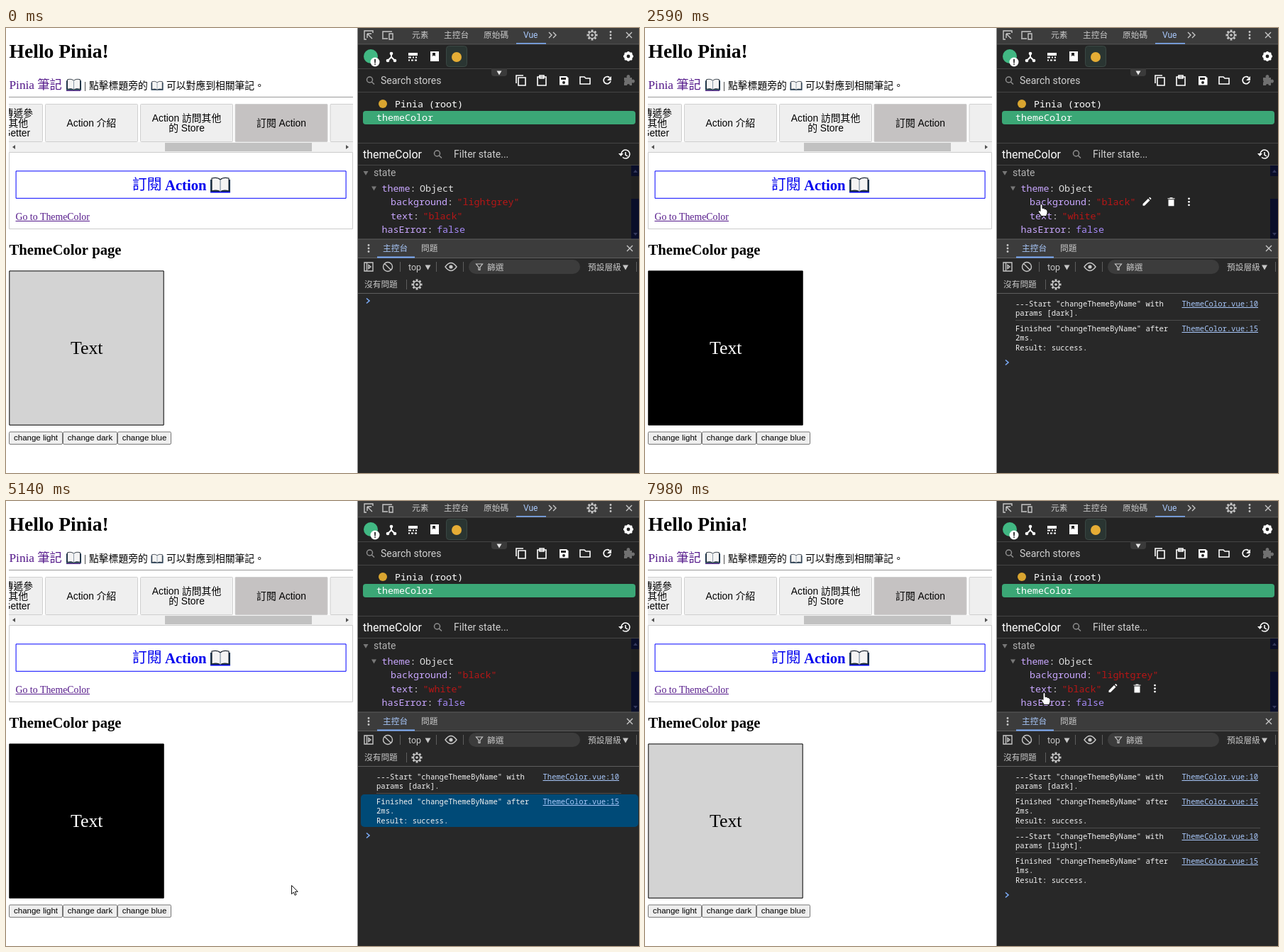
These frames come from a looping animation (892x628 px, 8 s). An HTML page with a canvas:

```html
<!DOCTYPE html>
<html lang="zh-Hant">
<head>
<meta charset="utf-8">
<title>Pinia notes</title>
<style>
html, body { margin: 0; width: 100%; height: 100%; overflow: hidden; background: #fff; }
canvas { display: block; }
</style>
</head>
<body>
<canvas id="stage" width="892" height="628"></canvas>
<script>
const c = document.getElementById('stage').getContext('2d');
const CJK = '"Noto Sans CJK TC", "Noto Sans CJK", sans-serif';
const SERIF = '"Liberation Serif", ' + CJK;
const SANS = '"Liberation Sans", ' + CJK;
const UI = 'Roboto, ' + CJK;
const MONO = '"Noto Sans Mono", monospace';
const LOOP = 8000;

// cursor path: time, x, y
const path = [
  [250, 822, 612], [390, 700, 400], [460, 620, 286], [740, 380, 420], [1010, 126, 580],
  [1080, 119, 573], [1965, 119, 573], [2310, 330, 420], [2520, 520, 290], [2600, 560, 246],
  [2720, 575, 247], [2800, 570, 262], [2870, 565, 266], [3080, 570, 310], [3220, 566, 424],
  [3290, 560, 400], [3500, 560, 400], [3700, 590, 438], [3980, 579, 428], [4330, 579, 428],
  [4600, 560, 470], [4930, 531, 515], [5000, 525, 519], [5300, 280, 565], [5560, 29, 594],
  [5630, 40, 588], [5830, 44, 586], [6100, 46, 583], [6590, 46, 583], [6850, 681, 323],
  [6890, 681, 323], [7000, 640, 260], [7130, 600, 228], [7300, 590, 240], [7420, 600, 246],
  [7700, 575, 250], [7840, 565, 260], [7980, 562, 270]
];
const presses = [[1630, 1760], [3430, 3500], [4180, 4310], [6310, 6380]];

const within = (t, a, b) => t >= a && t < b;

function cursorAt(t) {
  if (t < 250) return null;
  const q = 250 + Math.floor((t - 225) / 69.02) * 69.02;
  let i = 1;
  while (i < path.length - 1 && path[i][0] < q) i++;
  const [t0, x0, y0] = path[i - 1], [t1, x1, y1] = path[i];
  const k = Math.min(1, Math.max(0, (q - t0) / (t1 - t0)));
  return { x: Math.round(x0 + (x1 - x0) * k), y: Math.round(y0 + (y1 - y0) * k) };
}

function text(s, x, y, font, color, align = 'left') {
  c.font = font;
  c.fillStyle = color;
  c.textAlign = align;
  c.fillText(s, x, y);
}
function rect(x, y, w, h, color) {
  c.fillStyle = color;
  c.fillRect(x, y, w, h);
}
function box(x, y, w, h, fill, edge, r = 0) {
  const d = edge ? .5 : 0;
  c.beginPath();
  c.roundRect(x + d, y + d, w - 2 * d, h - 2 * d, r);
  if (fill) { c.fillStyle = fill; c.fill(); }
  if (edge) { c.strokeStyle = edge; c.lineWidth = 1; c.stroke(); }
}
function dot(x, y, r, color) {
  c.fillStyle = color;
  c.beginPath();
  c.arc(x, y, r, 0, 7);
  c.fill();
}
function shape(d, x, y, fill, stroke, w = 1.4) {
  c.save();
  c.translate(x, y);
  const p = new Path2D(d);
  if (fill) { c.fillStyle = fill; c.fill(p); }
  if (stroke) { c.strokeStyle = stroke; c.lineWidth = w; c.stroke(p); }
  c.restore();
}
const line = (d, x, y, color = '#c7c7c7', w) => shape(d, x, y, null, color, w);
const down = (x, y, color = '#c7c7c7', s = 4) => shape(`M${-s} ${-s * .75}H${s}L0 ${s}Z`, x, y, color);
const cross = (x, y) => line('M-4-4 4 4M4-4-4 4', x, y);
const dots = (x, y, color = '#c7c7c7') => [-4.5, 0, 4.5].forEach(d => dot(x, y + d, 1.4, color));
const lens = (x, y) => line('M3.5 0A4 4 0 1 1-4.5 0A4 4 0 1 1 3.5 0M2.2 3 6 6.5', x, y - 1, '#8f8f8f', 1.5);

function gear(x, y, r, color, solid) {
  c.save();
  c.translate(x, y);
  c.strokeStyle = color;
  c.lineWidth = solid ? r * .55 : 1.5;
  c.beginPath();
  c.arc(0, 0, r * .62, 0, 7);
  c.stroke();
  c.lineWidth = r * .38;
  for (let i = 0; i < 8; i++) {
    c.rotate(Math.PI / 4);
    c.beginPath();
    c.moveTo(r * .68, 0);
    c.lineTo(r, 0);
    c.stroke();
  }
  if (!solid) dot(0, 0, r * .24, color);
  c.restore();
}

function book(x, y, w) {
  const k = w / 28;
  c.save();
  c.translate(x, y);
  c.scale(k, k);
  shape('M0 3H28V21H0Z', 0, 0, '#17344f');
  shape('M2 1Q10-1 14 3Q18-1 26 1V19Q18 17 14 20Q10 17 2 19Z', 0, 0, '#f4f4f4', '#202a35', 1.2);
  line('M14 3V20', 0, 0, '#8090a0', 1.2);
  c.restore();
}

function tab(x, w, lines, on) {
  box(x, 107, w, 54, on ? '#c5c2c2' : '#efefef', '#cfcfcf', 1);
  lines.forEach((s, i) =>
    text(s, x + w / 2, 139 + (i - (lines.length - 1) / 2) * 14, '300 13.8px ' + SANS, '#000', 'center'));
}

function drawPage(dark, cur) {
  rect(0, 0, 496, 628, '#fff');
  text('Hello Pinia!', 4.5, 42, 'bold 27.6px ' + SERIF, '#000');
  text('Pinia 筆記', 4.5, 86, '300 17.25px ' + SERIF, '#551a8b');
  book(85, 72, 21);
  rect(85, 88, 20, 1, '#551a8b');
  const body = '300 13.8px ' + SERIF;
  text('|', 110, 86, body, '#000');
  text('點擊標題旁的', 117, 86, body, '#000');
  book(204.5, 75, 17);
  text('可以對應到相關筆記。', 226, 86, body, '#000');
  rect(4, 97, 485, 1, '#9a9a9a');

  c.save();
  c.beginPath();
  c.rect(4, 100, 485, 76);
  c.clip();
  box(-79, 107, 131, 54, '#efefef', '#cfcfcf', 1);
  ['傳遞參', '其他', 'Getter'].forEach((s, i) =>
    text(s, [38, 31, 34][i], 125 + i * 14, '300 13.8px ' + SANS, '#000', 'right'));
  tab(55, 131, ['Action 介紹']);
  tab(189, 131, ['Action 訪問其他', '的 Store']);
  tab(322.5, 131, ['訂閱 Action'], true);
  tab(456.5, 131, []);
  rect(4, 161, 485, 14, '#f1f1f1');
  rect(224, 162, 207, 12, '#c1c1c1');
  shape('M2-3V3L-2 0Z', 11, 168, '#505050');
  shape('M-2-3V3L2 0Z', 481, 168, '#505050');
  c.restore();

  box(4, 175, 485, 109, null, '#ccc');
  box(13.6, 201.4, 466, 39.4, null, '#00f');
  text('訂閱', 178, 228, '500 20.7px ' + SERIF, '#0000ee');
  text('Action', 224, 228.5, 'bold 20.7px ' + SERIF, '#0000ee');
  book(288, 211, 28);
  rect(288, 231, 28, 1.5, '#0000ee');
  text('Go to ThemeColor', 13.5, 271, '13.8px ' + SERIF, '#551a8b');
  rect(13.5, 272, 104.5, 1, '#551a8b');

  text('ThemeColor page', 4.5, 320, 'bold 20.7px ' + SERIF, '#000');
  box(4.3, 342.4, 218.4, 218.4, dark ? '#000' : '#d3d3d3', '#000');
  text('Text', 113.7, 460, '25.9px ' + SERIF, dark ? '#fff' : '#000', 'center');
  [['light', 4, 76], ['dark', 80, 77], ['blue', 157, 76]].forEach(([s, x, w]) => {
    const over = cur && within(cur.x, x, x + w) && within(cur.y, 570, 588);
    box(x, 569.5, w, 18.4, over ? '#e5e5e5' : '#efefef', over ? '#4f4f4f' : '#767676', 1.5);
    text('change ' + s, x + w / 2, 582, '11.5px ' + SANS, '#000', 'center');
  });
}

function drawTop() {
  rect(496, 0, 396, 628, '#282828');
  rect(496, 0, 396, 23, '#3c3c3c');
  line('M6-3V-6H-6V6H-3M-2-2 5 5M-2-2V4M-2-2H4', 511, 10);
  line('M-7 4V-5H6M-8 5H0M2-2H7V6H2Z', 538, 10);
  const f = '11.7px ' + UI;
  text('元素', 572, 13.5, f, '#c7c7c7');
  text('主控台', 617, 13.5, f, '#c7c7c7');
  text('原始碼', 673, 13.5, f, '#c7c7c7');
  text('Vue', 729, 14, '12px ' + UI, '#a8c7fa');
  rect(719, 21, 42, 2, '#7cacf8');
  line('M-5-4-1 0-5 4M1-4 5 0 1 4', 770, 10);
  gear(826, 10, 7.5, '#c7c7c7');
  dots(852, 10);
  cross(878, 10);

  rect(496, 23, 396, 275, '#242424');
  rect(496, 22.5, 396, .8, '#5e5e5e');
  dot(514, 40, 10, '#41b883');
  dot(520, 48, 6.5, '#fff');
  text('!', 520, 52, 'bold 11px ' + UI, '#000', 'center');
  line('M0-5V0M0 0-5 5M0 0 5 5', 543, 41, '#fff', 2);
  [[0, -5], [-5, 5], [5, 5]].forEach(([x, y]) => dot(543 + x, 41 + y, 2.3, '#fff'));
  rect(567, 35, 13, 4, '#fff');
  line('M-6 0H-2M0 0H2M4 0H6M-6 4H-4M-2 4H1M3 4H6', 573, 41.5, '#fff', 2);
  shape('M-6-7H6V7H-6ZM-3-5V0L-1-1.5 1 0V-5Z', 604, 40, '#fff');
  box(620, 25, 30, 30, '#2a3532', '#3b4844', 4);
  dot(635, 41, 7, '#e5ad35');
  gear(877, 40, 7, '#fff', true);
  rect(496, 57, 396, 1, '#454545');

  shape('M-11 0H11V7Q11 11 7 11H-7Q-11 11-11 7Z', 695, 57, '#3a3a3a');
  down(695, 63, '#e8e8e8', 3.5);
  lens(513, 74);
  text('Search stores', 528, 79, '14px ' + UI, '#cfcfcf');
  line('M-6 4V-7H4M-3-4H7V7H-3Z', 725, 74, '#fff', 1.6);
  line('M-6-5H6V7H-6ZM-3-7H3V-3H-3Z', 755, 74, '#fff', 1.6);
  shape('M-6-6H4L6.5-3.5V6.5H-6Z', 786, 74, '#fff');
  rect(782, 70, 7, 3, '#242424');
  dot(786, 77, 2, '#242424');
  line('M-7-5H-1L1-3H7V5H-7Z', 816, 74, '#fff', 1.6);
  line('M5 1A5 5 0 1 1 3.5-4', 847, 74, '#fff', 1.7);
  shape('M6-6V0H0Z', 847, 74, '#fff');
  shape('M-6-4H-2A2.5 2.5 0 1 1 2-4H5V-1A2.5 2.5 0 1 1 5 3V7H2A2 2 0 0 0-2 7H-6V3A2 2 0 0 0-6 0Z', 877, 74, '#707070');
  rect(496, 90, 396, 1, '#454545');

  dot(531, 107, 6, '#d9a530');
  text('Pinia (root)', 548, 112, '13.33px ' + MONO, '#fff');
  box(503, 117, 384, 19, '#3ba776', null, 4);
  text('themeColor', 522, 131, '13.33px ' + MONO, '#fff');
  rect(496, 162, 396, 1, '#454545');
  text('themeColor', 503, 183.5, '16px ' + UI, '#fff');
  lens(608, 178);
  text('Filter state...', 631, 183, '14px ' + UI, '#cfcfcf');
  line('M-5 0A6 6 0 1 1-3 4.5M1-3V1L4 3', 872, 178, '#fff', 1.5);
  shape('M-9-1H-2L-5.5 3Z', 872, 178, '#fff');
  rect(496, 193, 396, 1, '#454545');
}

function drawState(dark, cur) {
  down(507, 204.5, '#777', 3.5);
  text('state', 518, 208.5, '14px ' + UI, '#b0b0b0');
  down(518.5, 226, '#777', 3.5);
  const rows = [
    ['theme', 'Object', '#e0e0e0', 529.5],
    ['background', dark ? '"black"' : '"lightgrey"', '#b91616', 542],
    ['text', dark ? '"white"' : '"black"', '#b91616', 542],
    ['hasError', 'false', '#a78bfa', 529.5]
  ];
  const f = '13.33px ' + MONO;
  rows.forEach(([key, val, color, x], i) => {
    const y = 231 + i * 19.3, colon = x + key.length * 8, start = colon + 13.5;
    text(key, x, y, f, '#c9a7ff');
    text(':', colon, y, f, '#e0e0e0');
    text(val, start, y, f, color);
    const top = 218 + i * 19.3;
    if (cur && cur.x > 500 && cur.x < 880 && within(cur.y, top, top + 19.3)) {
      const end = start + val.length * 8, my = y - 5;
      shape('M-6 5.5V3L1.5-4.5 4-2-3.5 5.5ZM2.5-5.5 4-6.5 6-4.5 5-3Z', end + 16, my, '#fff');
      shape('M-4-3H4V6H-4ZM-5-5H-2V-6H2V-5H5V-4H-5Z', end + 50, my, '#fff');
      dots(end + 75, my, '#fff');
    }
  });
  rect(881, 194, 11, 104, '#0a0e29');
  rect(881, 209, 11, 32, '#212121');
  shape('M-3 2H3L0-2Z', 887, 202, '#34385c');
  shape('M-3-2H3L0 2Z', 887, 291, '#34385c');
}

function drawConsoleBar() {
  rect(496, 298, 396, 26, '#3c3c3c');
  rect(496, 297.5, 396, 1, '#5e5e5e');
  rect(496, 324, 396, 1, '#5e5e5e');
  dots(511, 311);
  const f = '11.7px ' + UI, g = '#c7c7c7';
  text('主控台', 531, 315, f, '#a8c7fa');
  rect(523, 322.5, 53, 2, '#7cacf8');
  text('問題', 585, 315, f, g);
  cross(879, 311);
  line('M-6-6H6V6H-6ZM-2.5-6V6M0-2.5 3 0 0 2.5Z', 511, 337);
  line('M6.5 0A6.5 6.5 0 1 1-6.5 0A6.5 6.5 0 1 1 6.5 0M-4.5-4.5 4.5 4.5', 538, 337);
  text('top', 567, 341.5, '12.5px ' + UI, g);
  down(594.5, 337.5);
  line('M-8 0Q0-11 8 0Q0 11-8 0Z', 627, 337);
  dot(627, 337, 2.6, g);
  [555, 606, 644, 888].forEach(x => rect(x, 330, 1, 14, '#5e5e5e'));
  box(652, 327, 157, 20, '#3c3c3c', null, 10);
  line('M-4.5-4H4.5L1 .5V4.5H-1V.5Z', 667, 337, g, 1.2);
  text('篩選', 678, 341.5, f, g);
  text('預設層級', 820, 341.5, f, g);
  down(873, 337.5);
  text('沒有問題', 505, 366, f, g);
  rect(564, 355, 1, 14, '#5e5e5e');
  gear(579, 362, 7.5, g);
  rect(496, 374, 396, 1, '#5e5e5e');
}

function drawLog(count, selected) {
  const f = '500 10.55px ' + MONO, ink = '#f0f0f0';
  if (selected) {
    const [y, h] = selected === 1 ? [379, 33] : [414, 46];
    box(500, y, 391, h, '#004a77', null, 5);
  }
  const entry = (lines, y, at) => {
    lines.forEach((s, i) => text(s, 522, y + i * 13.8, f, ink));
    text('ThemeColor.vue:' + at, 756.5, y, f, '#a8c7fa');
    rect(756.5, y + 1.5, 107.5, 1, '#a8c7fa');
  };
  for (let i = 0; i < count; i++) {
    const y = i * 84;
    entry(['---Start "changeThemeByName" with', `params [${i ? 'light' : 'dark'}].`], 392.5 + y, 10);
    rect(522, 412 + y, 345, 1, '#4c4c4c');
    entry(['Finished "changeThemeByName" after', `${2 - i}ms.`, 'Result: success.'], 427.5 + y, 15);
    if (i < count - 1) rect(522, 461, 345, 1, '#4c4c4c');
  }
  line('M-2-3.5 2 0-2 3.5', 510, 385 + (count ? 3 + count * 84 : 0), '#7cacf8', 1.6);
}

function drawCursor(cur, pressed) {
  const { x, y } = cur;
  if (pressed) dot(x - .5, y, 10, 'rgba(194,184,0,.78)');
  const hand = x > 500 && x < 880 && within(y, 218, 296);
  shape(hand
    ? 'M-1.5 1.5Q-1.5 0 0 0T1.5 1.5V6Q4 5 4.5 7Q6.5 6.5 7 8Q8.5 8 8.5 10V13L7 17H0L-4 11Q-4.5 9-3 9L-1.5 10Z'
    : 'M0 0V12.2L2.8 9.6 4.6 13.8 6.6 13 4.8 8.8H8.7Z', x + .5, y + .5, '#fff', '#111', 1);
}

function draw(now) {
  const t = now % LOOP;
  const cur = cursorAt(t);
  const pageDark = within(t, 1760, 6380), stateDark = within(t, 1830, 6500);
  const count = t < 1760 ? 0 : t < 6440 ? 1 : 2;
  const selected = within(t, 3500, 4180) ? 1 : within(t, 4180, 6310) ? 2 : 0;
  drawPage(pageDark, cur);
  drawTop();
  drawState(stateDark, cur);
  drawConsoleBar();
  drawLog(count, selected);
  rect(495, 0, 1, 628, '#8a8a8a');
  if (cur) drawCursor(cur, presses.some(([a, b]) => within(t, a, b)));
}

const start = performance.now();
function tick() {
  draw(performance.now() - start);
  requestAnimationFrame(tick);
}
tick();
</script>
</body>
</html>
```
